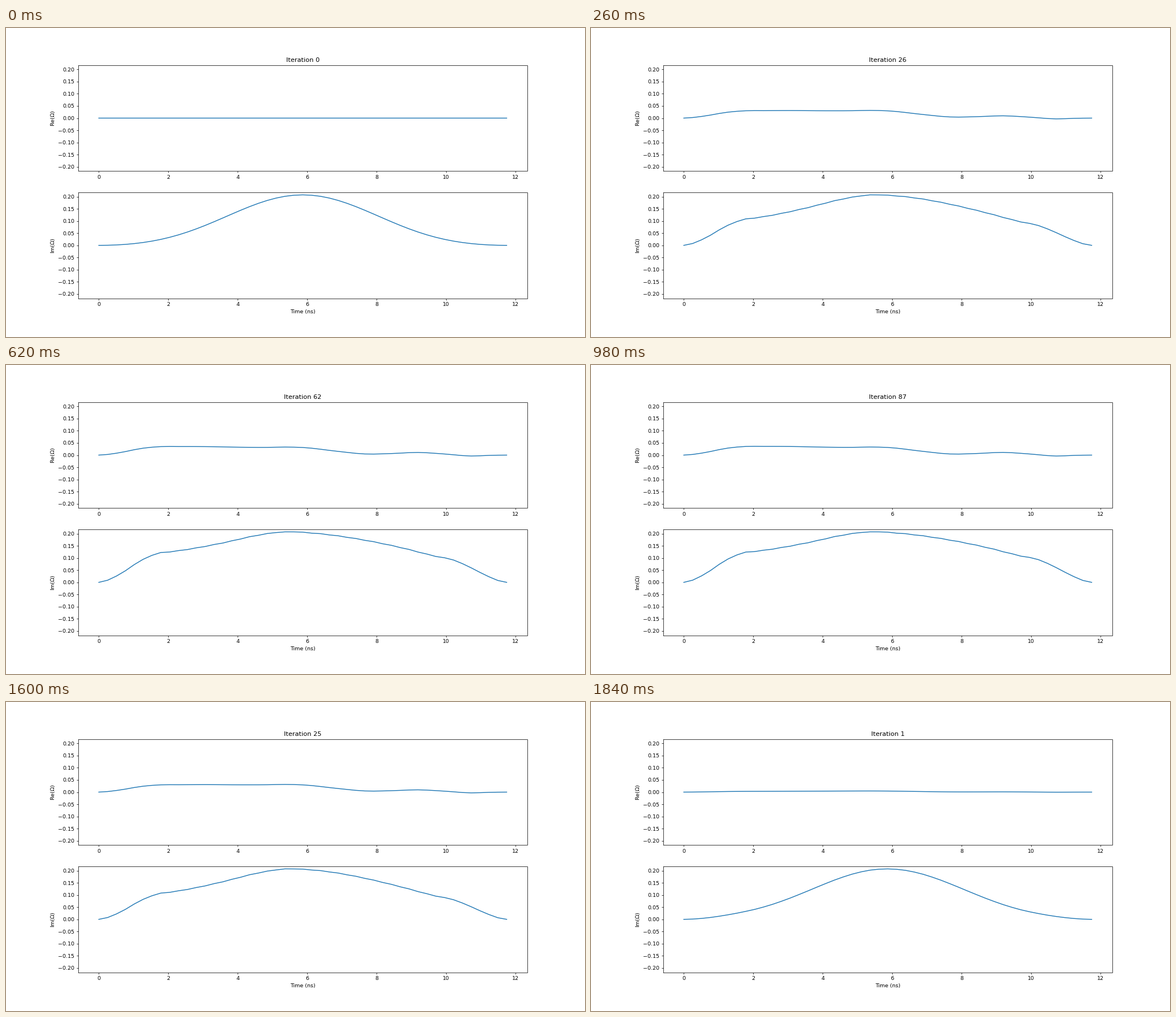
These frames come from a looping animation (1025x547 px, 1860 ms). A matplotlib script:

```python
import numpy as np
import matplotlib.pyplot as plt
from matplotlib.animation import FuncAnimation

DPI = 547 / 8
FRAMES = 93
LAST = 2 * FRAMES - 1
STEPS = 46
PEAK = 0.2077
T_END = 11.75

step = np.arange(STEPS + 1)
u = step / STEPS


def spline(keys):
    """Cubic Hermite curve through (step, value) keys, flat at both ends."""
    x, y = np.array(keys, float).T
    m = np.gradient(y, x)
    m[0] = m[-1] = 0
    k = np.clip(np.searchsorted(x, step, side="right") - 1, 0, len(x) - 2)
    h = x[k + 1] - x[k]
    s = (step - x[k]) / h
    d = (y[k + 1] - y[k]) / h
    bend = s * (1 - s) * ((1 - s) * (m[k] - d) - s * (m[k + 1] - d))
    return y[k] + h * (s * d + bend)


# Optimised pulse through key points in units of 1e-4, with a step-to-step ripple
ripple = np.where(abs(step - STEPS / 2) < 17, -6.5 * (-1.0) ** step, 0)
re_opt = 1e-4 * spline([
    (0, 0), (2, 80), (5, 290), (7, 356), (9, 358), (12, 354), (16, 325),
    (19, 317), (21, 330), (23, 313), (27, 152), (30, 46), (33, 65),
    (36, 111), (39, 46), (42, -38), (44, -12), (46, 0)])
im_opt = 1e-4 * (ripple + spline([
    (0, 0), (2, 265), (5, 963), (7, 1240), (8, 1272), (10, 1370), (14, 1633),
    (18, 1946), (21, 2085), (24, 2029), (30, 1740), (34, 1447), (38, 1085),
    (40, 933), (42, 606), (44, 234), (46, 0)]))

im_start = PEAK * (0.43 - 0.5 * np.cos(2 * np.pi * u) + 0.07 * np.cos(4 * np.pi * u))
bump = np.exp(-((step - 20) / 6) ** 2 / 2) * np.sin(np.pi * u)


def residual(n):
    """Share of the way to the optimum still left after n iterations."""
    return 0.5 * np.exp(-n / 21) + 0.5 * np.exp(-n / 7.8)


def pulse(n):
    p = (1 - residual(n)) / (1 - residual(87))
    transient = 0.0145 * (np.exp(-n / 20) - np.exp(-n / 5))
    re = p * re_opt + transient * bump
    im = im_start + p * (im_opt - im_start)
    return re, np.minimum(im, PEAK)


def iteration(frame):
    """Count up in twos, then back down."""
    return min(2 * frame, LAST - 2 * frame)


fig, axes = plt.subplots(2, 1, figsize=(1025 / DPI, 8), dpi=DPI)
fig.subplots_adjust(left=0.125, right=0.9, bottom=0.125, top=0.88, hspace=0.2)

lines = []
for ax, part in zip(axes, ("Re", "Im")):
    lines += ax.plot(T_END * u, 0 * u, color="#1f77b4", lw=1.5, snap=False)
    ax.set_ylim(-1.05 * PEAK, 1.05 * PEAK)
    ax.set_yticks(np.arange(-4, 5) * 0.05)
    ax.set_ylabel(part + r"($\Omega$)")
axes[1].set_xlabel("Time (ns)")
title = axes[0].set_title("Iteration 0")


def draw(frame):
    n = iteration(frame)
    for line, values in zip(lines, pulse(n)):
        line.set_ydata(values)
    title.set_text(f"Iteration {n}")
    return [*lines, title]


anim = FuncAnimation(fig, draw, frames=FRAMES, interval=20, repeat=True,
                     repeat_delay=0, blit=False)
plt.show()
```
